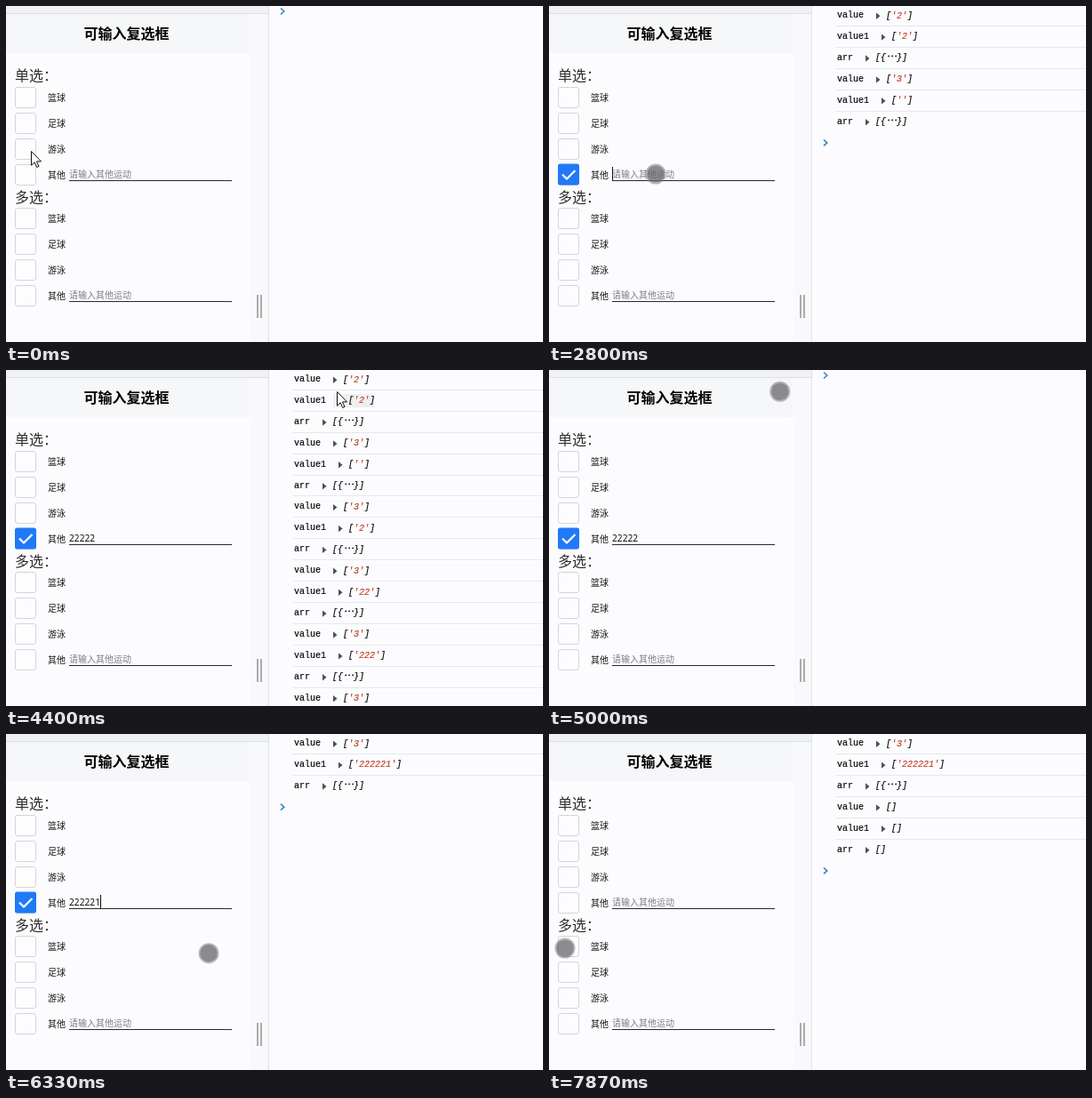
An HTML page for the animation above (8 s loop, 604 by 378 pixels).

```html
<!DOCTYPE html>
<html lang="zh-CN">
<head>
<meta charset="utf-8">
<style>
  html, body { margin: 0; width: 100%; height: 100%; overflow: hidden; background: #fcfcff; }
  svg { display: block; }
  text { white-space: pre; }
  .ui { font-family: "Noto Sans CJK SC", "Noto Sans CJK", sans-serif; font-size: 10px; fill: #111; }
  .title { font-size: 16px; font-weight: bold; fill: #000; }
  .head { font-size: 16px; fill: #2c2c2c; }
  .hint { fill: #7c7c80; }
  .typed { font: 10.2px "Noto Sans", sans-serif; fill: #111; }
  .log { font: 10px "Liberation Mono", monospace; fill: #000; stroke: #000; stroke-width: .15; }
  .val { font-style: italic; }
  .str { fill: #c0381c; stroke: #c0381c; }
  .dots { font: italic 12px "Noto Sans CJK SC", "Noto Sans CJK", sans-serif; }
</style>
</head>
<body>
<svg width="604" height="378" viewBox="0 0 604 378">
  <rect width="604" height="378" fill="#fcfcff"/>
  <rect x="275" width="20" height="378" fill="#f8f9fa"/>
  <rect y="9" width="274" height="44" fill="#f6f7f8"/>
  <rect width="295" height="8" fill="#eff1f3"/>
  <rect y="8" width="295" height="1" fill="#dde1e5"/>
  <rect x="295" width="1" height="378" fill="#dde3ea"/>
  <path d="M283 325V351M287 325V351" stroke="#999" stroke-width="1.6"/>
  <text class="ui title" x="135.5" y="37" text-anchor="middle">可输入复选框</text>
  <g id="form"></g>
  <g id="check">
    <rect x="10" y="-12" width="24" height="24" rx="2.5" fill="#2079f6"/>
    <path d="M15 0L20 5L29.5 -4.5" fill="none" stroke="#fff" stroke-width="2.2"/>
  </g>
  <text id="hint" class="ui hint" x="71" y="193">请输入其他运动</text>
  <text id="typed" class="typed" x="71" y="193"></text>
  <rect id="caret" y="181" width="1" height="15" fill="#111"/>
  <rect id="hover" x="368" y="27" width="46" height="15" fill="#efefef"/>
  <g id="rows"></g>
  <path id="prompt" d="M309 -3.5L312.8 0L309 3.5" fill="none" stroke="#3588c4" stroke-width="1.6"/>
  <g id="touch">
    <circle r="10.6" fill="none" stroke="#808084" stroke-width="1.8" opacity=".55"/>
    <circle r="9.8" fill="#66666a" opacity=".75"/>
  </g>
  <path id="arrow" d="M.5 .5V16.2L4.2 12.8L6.7 18.4L9 17.4L6.5 11.9H11.5Z" fill="#fff" stroke="#111"/>
</svg>
<script>
const LOOP = 8000, TICK = 1000 / 15, PITCH = 23.9, DIGIT = 5.85;
const $ = id => document.getElementById(id);

function group(title, top) {
  const options = ['篮球', '足球', '游泳', '其他'].map((name, i) => {
    const y = Math.round(top + 24.5 + i * 29);
    return `<rect x="10.5" y="${y - 11.5}" width="23" height="23" rx="2.5" fill="#fdfdff" stroke="#d4d4da"/>
      <text class="ui" x="47" y="${y + 3.5}">${name}</text>`;
  }).join('');
  return `<text class="ui head" x="10" y="${top + 6}">${title}：</text>${options}
    <rect x="71" y="${Math.round(top + 117.5)}" width="183" height="1" fill="#2a2a2e"/>`;
}
$('form').innerHTML = group('单选', 78) + group('多选', 214.5) +
  '<text class="ui hint" x="71" y="329.3">请输入其他运动</text>';

// Console output: each entry prints three rows.
const quoted = s => `[<tspan class="str">'${s}'</tspan>]`;
const entry = (choice, text) => [
  ['value', quoted(choice)],
  ['value1', quoted(text)],
  ['arr', '[{<tspan class="dots">…</tspan>}]']
];
const firstLog = [entry('2', '2'), ...['', '2', '22', '222', '2222', '22222'].map(s => entry('3', s))].flat();
const secondLog = [...entry('3', '222221'), ['value', '[]'], ['value1', '[]'], ['arr', '[]']];

function logRow([label, value], i) {
  const y = 10 + i * PITCH, x = 338 + label.length * 6;
  const rule = i ? `<rect x="323" y="${Math.round(y - 12)}" width="281" height="1" fill="#e2e9ef"/>` : '';
  return `${rule}<text class="log" x="324" y="${y + 3}">${label}</text>
    <path d="M${x} ${y - 2.5}l4.5 3.7l-4.5 3.7z" fill="#505054"/>
    <text class="log val" x="${x + 11}" y="${y + 3.5}">${value}</text>`;
}

// [tick, checked option, typed text, printed rows]
const states = [
  [0, -1, '', 0], [10, 2, '', 2], [11, 2, '', 3], [22, 3, '', 5], [23, 3, '', 6],
  [50, 3, '2', 9], [52, 3, '22', 11], [53, 3, '22', 12], [54, 3, '222', 15],
  [57, 3, '2222', 18], [59, 3, '22222', 21], [74, 3, '22222', 0],
  [90, 3, '222221', 2], [91, 3, '222221', 3], [106, -1, '222221', 5], [107, -1, '', 6]
];
const caretSpans = [[27, 35], [42, 65], [84, 101]];

// [tick, x, y]
const path = [
  [0, 28, 163], [13, 28, 163], [16, 28, 184], [21, 28, 184], [22, 46, 186], [24, 120, 189],
  [60, 120, 189], [66, 372, 24], [69, 380, -22], [74, 300, -22], [78, 139, 163], [80, 139, 163],
  [85, 159, 174], [87, 159, 174], [93, 344, 8], [96, 170, 366], [98, 31, 208], [99, 31, 208],
  [101, 12, 206], [103, 25, 190], [106, 25, 190], [110, 31, 278], [111, 31, 278], [118, 18, 241]
];

function pointer(tick) {
  const next = path.findIndex(p => p[0] > tick);
  if (next < 0) return path[path.length - 1].slice(1);
  const a = path[next - 1], b = path[next], f = (tick - a[0]) / (b[0] - a[0]);
  return [1, 2].map(i => a[i] + (b[i] - a[i]) * f);
}

const show = (id, on) => $(id).setAttribute('visibility', on ? 'visible' : 'hidden');
const move = (id, x, y) => $(id).setAttribute('transform', `translate(${x} ${y})`);
let shownTick = -1;

function render(time) {
  const tick = Math.floor((time % LOOP + 4) / TICK);
  if (tick === shownTick) return;
  shownTick = tick;

  const [, checked, text, count] = states.filter(s => s[0] <= tick).pop();
  show('check', checked >= 0);
  move('check', 0, 102.5 + checked * 29);
  show('hint', !text);
  $('typed').textContent = text;
  show('caret', caretSpans.some(([from, to]) => tick >= from && tick < to));
  $('caret').setAttribute('x', Math.floor(71 + text.length * DIGIT));

  const log = tick < 74 ? firstLog : secondLog;
  $('rows').innerHTML = log.slice(0, count).map(logRow).join('');
  move('prompt', 0, count ? 10.5 + count * PITCH : 6);

  const [x, y] = pointer(tick), arrow = tick < 8 || x > 295;
  show('arrow', arrow);
  show('touch', !arrow);
  move('arrow', x, y);
  move('touch', x, y);
  show('hover', count > 1 && x > 366 && x < 414 && y > 22 && y < 46);
}

const start = performance.now();
function loop() {
  render(performance.now() - start);
  requestAnimationFrame(loop);
}
loop();
</script>
</body>
</html>
```
